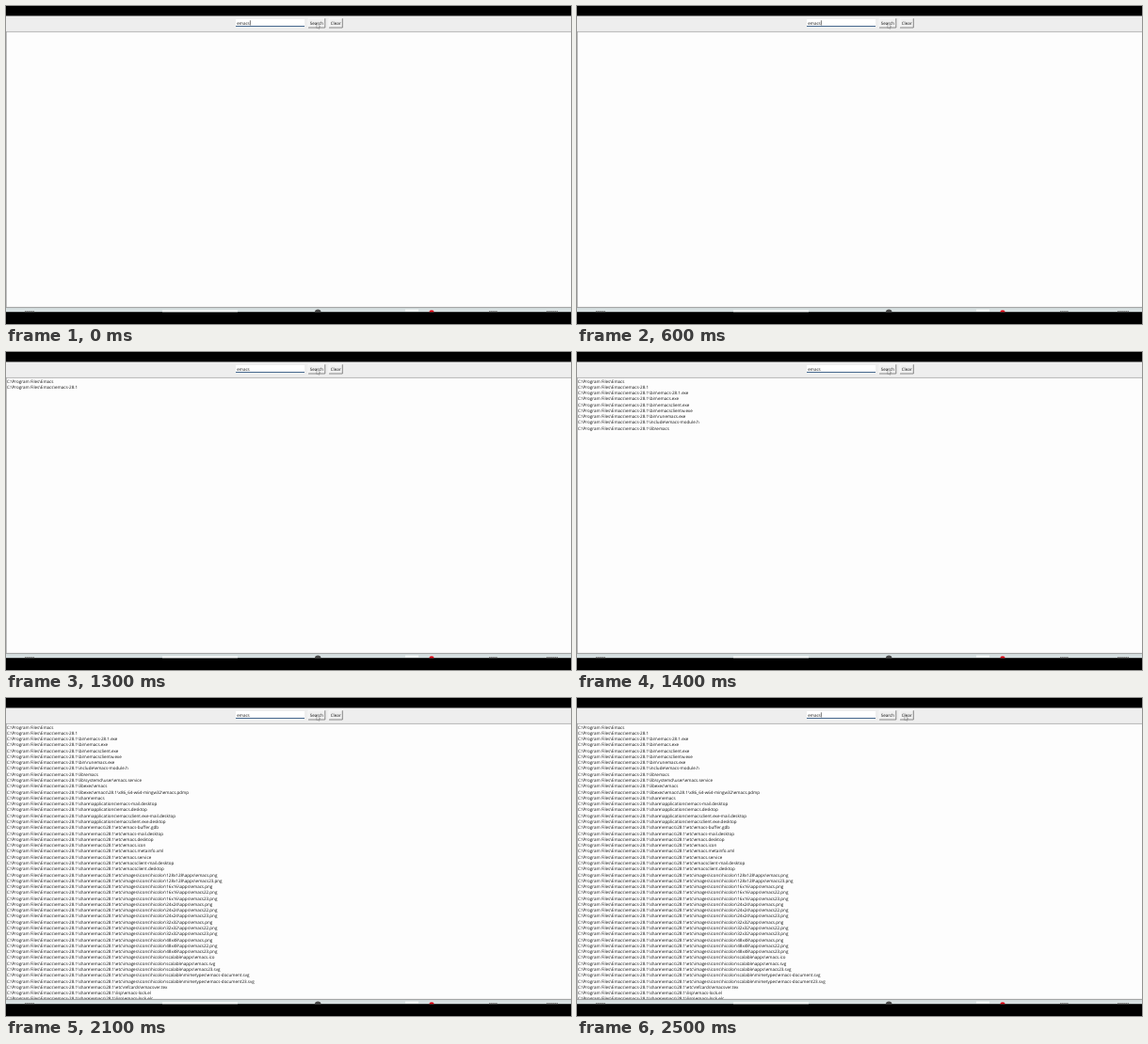
Recreate the animation shown at these times as an HTML page. Size 600 by 338 pixels, loop 2.7 s.

```html
<!DOCTYPE html>
<html lang="en">
<head>
<meta charset="utf-8">
<title>File search</title>
<style>
  html, body { margin: 0; width: 100%; height: 100%; overflow: hidden; background: #000; }
  svg { display: block; width: 100%; height: 100%; }
  text { font: 4.52px "Open Sans", "Noto Sans", sans-serif; fill: #111; text-rendering: geometricPrecision; white-space: pre; }
  .face { fill: #f0f0f0; }
  .light { fill: none; stroke: #fff; stroke-width: .6; }
  .dark { fill: none; stroke: #6c6c6c; stroke-width: .8; }
  .pressed .light { stroke: #6c6c6c; }
  .pressed .dark { stroke: #fff; }
  .pressed text { transform: translate(.4px, .4px); }
</style>
</head>
<body>
<svg viewBox="0 0 600 338">
  <clipPath id="listArea"><rect y="28" width="600" height="292"/></clipPath>
  <rect width="600" height="338"/>
  <rect y="10.5" width="600" height="17" fill="#eee"/>

  <rect x="244" y="14" width="73" height="7.5" fill="#fff"/>
  <path d="M244 21.5H317" stroke="#45678d" stroke-width="1"/>
  <text x="245.2" y="19.5">emacs</text>
  <path id="caret" d="M259.4 15.3V20.5" stroke="#222" stroke-width=".6"/>
  <g id="buttons"></g>

  <rect y="27" width="600" height="293.5" fill="#fdfdfd"/>
  <path d="M0 27.4H600M.4 27V320.3H600" fill="none" stroke="#a4a4a4" stroke-width=".8"/>
  <g id="list" clip-path="url(#listArea)"></g>

  <!-- sliver of the task bar -->
  <g id="taskbar">
    <rect y="320.8" width="600" height="4.4" fill="#d6dfe0"/>
    <path d="M166 324.3H246M424 323.5H438" stroke="#f3f6f6" stroke-width="2"/>
    <path d="M20 324.6H30M513 324.6H522M574 324.6H586" stroke="#777" stroke-width="1" stroke-dasharray="1.6 .5"/>
    <path d="M328 325.2a3.2 2.6 0 0 1 6.4 0z" fill="#444"/>
    <path d="M449.4 325.2a2.6 2 0 0 1 5.2 0z" fill="#e00012"/>
  </g>

  <path id="cursor" d="M0 0V5.2L1.2 4.1L2 6L2.8 5.6L2.1 3.8H3.6Z" fill="#fff" stroke="#444" stroke-width=".4"/>
</svg>
<script>
const LOOP = 2700, STEP = 100, ROW_HEIGHT = 6.28;
const byId = id => document.getElementById(id);

function add(parent, tag, attributes, content = '') {
  const node = document.createElementNS('http://www.w3.org/2000/svg', tag);
  for (const name in attributes) node.setAttribute(name, attributes[name]);
  node.textContent = content;
  parent.append(node);
  return node;
}

function addButton(label, left, right) {
  const group = add(byId('buttons'), 'g', {});
  const top = 13.3, bottom = 23;
  add(group, 'rect', { class: 'face', x: left, y: top, width: right - left, height: bottom - top });
  add(group, 'path', { class: 'light', d: `M${left} ${bottom}V${top}H${right}` });
  add(group, 'path', { class: 'dark', d: `M${left} ${bottom}H${right}V${top}` });
  add(group, 'text', { x: (left + right) / 2, y: 19.5, 'text-anchor': 'middle' }, label);
  return group;
}

const under = (folder, names) => names.split(' ').map(name => folder + '\\' + name);
const icons = (folder, names) => under('images\\icons\\hicolor\\' + folder, names);

function searchResults() {
  const root = 'C:\\Program Files\\Emacs';
  const etc = [
    ...'emacs-buffer.gdb emacs-mail.desktop emacs.desktop emacs.icon emacs.metainfo.xml emacs.service emacsclient-mail.desktop emacsclient.desktop'.split(' '),
    ...icons('128x128\\apps', 'emacs.png emacs23.png'),
    ...[16, 24, 32, 48].flatMap(n => icons(`${n}x${n}\\apps`, 'emacs.png emacs22.png emacs23.png')),
    ...icons('scalable\\apps', 'emacs.ico emacs.svg emacs23.svg'),
    ...icons('scalable\\mimetypes', 'emacs-document.svg emacs-document23.svg'),
    'refcards\\emacsver.tex'
  ];
  const files = [
    ...under('bin', 'emacs-28.1.exe emacs.exe emacsclient.exe emacsclientw.exe runemacs.exe'),
    'include\\emacs-module.h',
    ...under('lib', 'emacs systemd\\user\\emacs.service'),
    ...under('libexec', 'emacs emacs\\28.1\\x86_64-w64-mingw32\\emacs.pdmp'),
    'share\\emacs',
    ...under('share\\applications', 'emacs-mail.desktop emacs.desktop emacsclient.exe-mail.desktop emacsclient.exe.desktop'),
    ...etc.map(file => 'share\\emacs\\28.1\\etc\\' + file),
    ...under('share\\emacs\\28.1\\lisp', 'emacs-lock.el emacs-lock.elc')
  ];
  return [root, root + '\\emacs-28.1', ...files.map(file => root + '\\emacs-28.1\\' + file)];
}

const searchButton = addButton('Search', 321, 338.8);
addButton('Clear', 343, 357.3);
const rows = searchResults().map((path, i) =>
  add(byId('list'), 'text', { x: .9, y: 32.5 + i * ROW_HEIGHT }, path));

function visibleRows(t) {
  if (t < 1300) return 0;
  if (t < 1400) return 2;
  return t < 1500 ? 9 : rows.length;
}

function draw(now) {
  const t = Math.floor(now % LOOP / STEP) * STEP;
  // The caret stays on for 600 ms and off for 300 ms.
  const caretOn = (t + 300) % 900 < 600;
  byId('caret').style.visibility = caretOn ? 'visible' : 'hidden';
  searchButton.classList.toggle('pressed', t >= 400 && t < 600);

  const count = visibleRows(t);
  rows.forEach((row, i) => row.style.display = i < count ? '' : 'none');

  const p = Math.min(1, Math.max(0, (t - 2100) / 400));
  const x = 330 + 18 * p * p * (3 - 2 * p);
  byId('cursor').setAttribute('transform', `translate(${x} 18.3)`);
}

const start = performance.now();
function tick() {
  draw(performance.now() - start);
  requestAnimationFrame(tick);
}
tick();
</script>
</body>
</html>
```
